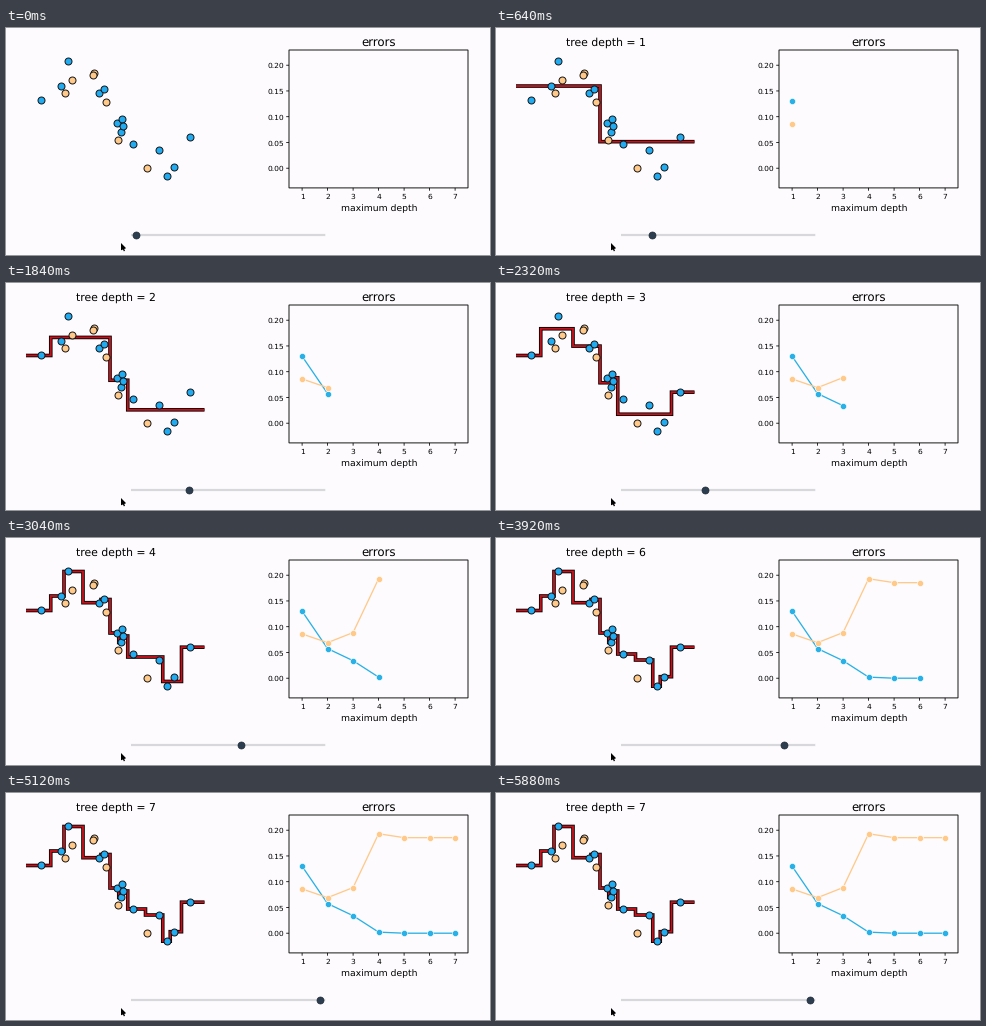
Recreate the animation shown at these times as a matplotlib script. Size 484 by 227 pixels, loop 5.92 s.

```python
import numpy as np
import matplotlib.pyplot as plt
from matplotlib.animation import FuncAnimation

W, H, DPI = 484, 227, 100
FRAMES, STEP_MS = 148, 40
FIRST, HOLD, DEEPEST = 15, 16, 7   # lead-in and frames per depth
LEFT, RIGHT = 20.5, 199            # span of the fitted curve
BG, BLUE, PEACH = "#fdfbfe", "#21abf0", "#ffc98a"
RED, INK = "#c4121d", "#2c3e50"

# the sampled data, in stage pixels
train = np.array([(35.5, 73), (55, 58.5), (62, 34), (93, 65.2), (98, 62),
                  (111, 95.5), (115.5, 105), (116, 92), (117.5, 98.5),
                  (127, 116.5), (153, 122.5), (161.5, 148.7), (168, 139.2),
                  (184, 109.7)])
test = np.array([(59, 66), (66, 52.5), (88.5, 45.8), (87, 48), (100, 74.7),
                 (112.5, 113), (141.5, 140.2)])


def px(n):
    return n * 72 / DPI


def fit(pts, depth, lo=LEFT, hi=RIGHT):
    """Greedy regression tree as a list of (start, end, level)."""
    y = pts[:, 1]
    if depth == 0 or len(pts) == 1:
        return [(lo, hi, y.mean())]
    cost = [y[:i].var() * i + y[i:].var() * (len(y) - i)
            for i in range(1, len(y))]
    i = int(np.argmin(cost)) + 1
    cut = pts[i - 1:i + 1, 0].mean()
    return fit(pts[:i], depth - 1, lo, cut) + fit(pts[i:], depth - 1, cut, hi)


def corners(tree):
    return np.array([(x, level) for lo, hi, level in tree for x in (lo, hi)]).T


def mse(tree, pts):
    lo, _, level = np.array(tree).T
    guess = level[np.searchsorted(lo, pts[:, 0]) - 1]
    return np.mean((pts[:, 1] - guess) ** 2)


depths = np.arange(1, DEEPEST + 1)
trees = [fit(train, d) for d in depths]
curves = [corners(t) for t in trees]
base = mse(trees[0], train) / .13   # squared pixels per unit of error

plt.rcParams.update({"font.family": "DejaVu Sans", "text.hinting": "none",
                     "lines.solid_capstyle": "butt",
                     "lines.solid_joinstyle": "miter"})
fig = plt.figure(figsize=(W / 100, H / 100), dpi=DPI, facecolor=BG)
ax = fig.add_axes([0, 0, 1, 1])
ax.set(xlim=(.5, W + .5), ylim=(H + .5, .5))
ax.axis("off")


def line(x, y, color, width, **kw):
    return ax.plot(x, y, color=color, lw=px(width), snap=False, **kw)[0]


def dots(x, y, color, size, edge, edge_width, width=0):
    return line(x, y, color, width, marker="o", ms=px(size), mec=edge,
                mew=px(edge_width), zorder=4)


def label(x, y, s, size, ha="center"):
    return ax.text(x, y, s, fontsize=px(size), ha=ha, va="baseline")


def err_x(depth):
    return 296.6 + 25.5 * (depth - 1)


def err_y(value):
    return 140.7 - 515 * np.asarray(value)


# left: samples and the fitted curve
title = label(110, 17.9, "", 10.9)
steps = [line([], [], color, width, zorder=3)
         for color, width in (("black", 3.6), (RED, 1.9))]
for pts, color in ((train, BLUE), (test, PEACH)):
    for x, y in pts:
        dots([x], [y], color, 7, "#111111", .95)

# right: error plot
x0, x1, y0, y1 = 283.5, 462.5, 22.5, 160.4
label(373.3, 17.9, "errors", 11.7)
label(373.3, 183.7, "maximum depth", 9.25)
ax.fill([x0, x1, x1, x0], [y0, y0, y1, y1], fill=False, ec="#1a1a1a",
        lw=px(1), snap=False)
for d in depths:
    line([err_x(d)] * 2, [y1, y1 + 2.8], "black", .8)
    label(err_x(d), 171.2, str(d), 7.5)
for v in np.arange(5) * .05:
    line([x0 - 2.8, x0], [err_y(v)] * 2, "black", .8)
    label(278.5, err_y(v) + 3, f"{v:.2f}", 7.5, "right")
errors = [(dots([], [], color, 6.2, "white", .6, 1.3),
           err_y([mse(t, pts) / base for t in trees]))
          for pts, color in ((train, "#27b1e6"), (test, PEACH))]

# slider and pointer
line([125.5, 319.8], [207.5, 207.5], "#d6d8db", 2.2)
knob = dots([], [], INK, 7, "#1c2834", .7)
ax.fill([115.5, 115.5, 120.6], [215.5, 222.8, 220.7], "black", lw=0)
line([117.2, 118.9], [219.5, 223.6], "black", 1.3)


def draw(frame):
    depth = int(np.clip((frame - FIRST) // HOLD + 1, 0, DEEPEST))
    title.set_text(f"tree depth = {depth}" if depth else "")
    for s in steps:
        s.set_data(*(curves[depth - 1] if depth else ([], [])))
    for artist, y in errors:
        artist.set_data(err_x(depths[:depth]), y[:depth])
    knob.set_data([130.4 + 26.35 * depth], [207.5])
    return [title, *steps, *(a for a, _ in errors), knob]


anim = FuncAnimation(fig, draw, frames=FRAMES, interval=STEP_MS, repeat=True,
                     repeat_delay=0)
plt.show()
```
